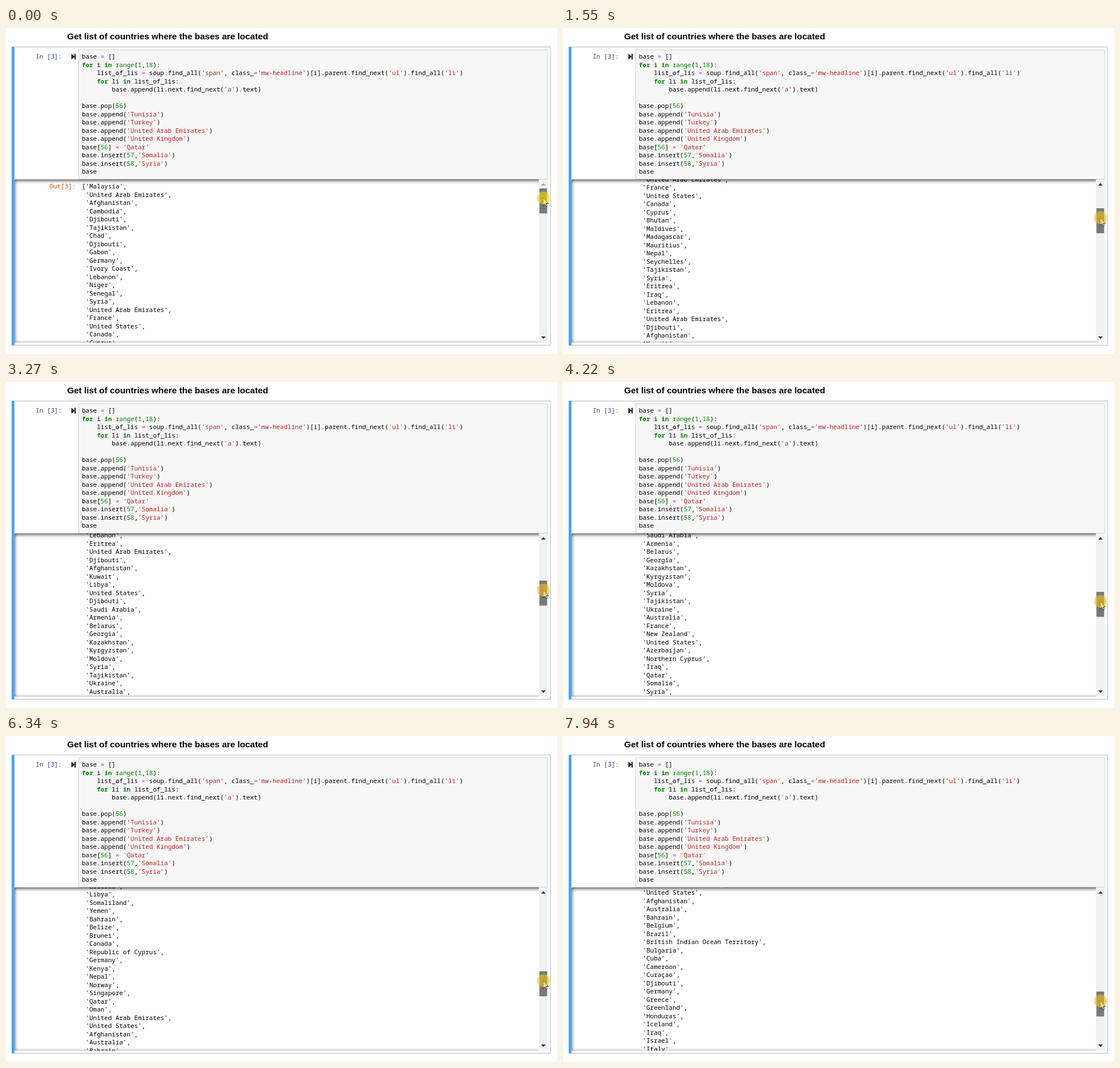
An HTML page that plays this animation: 973x575 px, repeating every 8000 ms.

```html
<!DOCTYPE html>
<html lang="en">
<head>
<meta charset="utf-8">
<title>Notebook output scroll</title>
<style>
  html, body { margin: 0; width: 100%; height: 100%; overflow: hidden; background: #fff; }
  #stage { position: absolute; left: 0; top: 0; width: 973px; height: 575px; overflow: hidden; background: #fff; }
  /* The right edge of the shadow stays hidden behind the scrollbar */
  #shadow {
    position: absolute; left: 15px; top: 267px; width: 942px; height: 288px;
    border-radius: 2px; box-shadow: inset 0 1.7px 6.9px rgba(0, 0, 0, .8);
  }
  svg { position: absolute; left: 0; top: 0; display: block; }
  text { font: 11px "Noto Sans Mono", "DejaVu Sans Mono", monospace; white-space: pre; }
  .title { font: bold 15.43px "Liberation Sans", Arial, sans-serif; }
  .keyword { fill: #008000; font-weight: bold; }
  .builtin { fill: #008000; }
  .number { fill: #008800; }
  .string { fill: #ba2121; }
  .operator { fill: #aa22ff; }
</style>
</head>
<body>
<div id="stage">
  <div id="shadow"></div>
  <svg width="973" height="575" viewBox="0 0 973 575">
    <text class="title" x="108" y="20">Get list of countries where the bases are located</text>

    <rect x="14.5" y="33.5" width="947" height="526" fill="none" stroke="#b8b8b8"/>
    <rect x="10" y="33" width="4.6" height="527" fill="#42a5f5"/>
    <rect x="128.5" y="38.5" width="828" height="228" fill="#f7f7f7" stroke="#cfcfcf"/>
    <text x="52.5" y="54" fill="#303f9f">In [3]:</text>
    <path d="M115.5 45.3V55.7L121 50.8V55.5H123V45.5H121V50.2Z" fill="#1c0d18"/>
    <g id="code"></g>

    <svg x="15" y="267" width="926" height="288" overflow="hidden">
      <g id="output">
        <text x="62" y="16" fill="#d84315">Out[3]:</text>
      </g>
    </svg>

    <rect x="941" y="267" width="16" height="288" fill="#f1f1f1"/>
    <path id="up" d="M945 278L949 273.6L953 278Z"/>
    <path d="M945 544L949 548.4L953 544Z" fill="#40202a"/>
    <g id="drag">
      <rect x="942" y="283" width="13.5" height="44" fill="#787878"/>
      <path d="M948.5 299.5V313.1L951.7 310.2L953.8 314.9L955.8 314L953.8 309.5H957.9Z"
            fill="#fff" stroke="#111" stroke-width=".85"/>
      <circle id="halo" cx="949" cy="299.5" r="11.3" fill-opacity=".62"/>
    </g>
  </svg>
</div>
<script>
const LOOP = 8000;
const LINE = 14.5;
const SCROLL_RATIO = 6.59;
const byId = id => document.getElementById(id);

const code = `base = []
for i in range(1,18):
    list_of_lis = soup.find_all('span', class_='mw-headline')[i].parent.find_next('ul').find_all('li')
    for li in list_of_lis:
        base.append(li.next.find_next('a').text)

base.pop(56)
base.append('Tunisia')
base.append('Turkey')
base.append('United Arab Emirates')
base.append('United Kingdom')
base[56] = 'Qatar'
base.insert(57,'Somalia')
base.insert(58,'Syria')
base`;

const countries = `Malaysia,United Arab Emirates,Afghanistan,Cambodia,Djibouti,Tajikistan,Chad,Djibouti,Gabon,Germany,
Ivory Coast,Lebanon,Niger,Senegal,Syria,United Arab Emirates,France,United States,Canada,Cyprus,
Bhutan,Maldives,Madagascar,Mauritius,Nepal,Seychelles,Tajikistan,Syria,Eritrea,Iraq,
Lebanon,Eritrea,United Arab Emirates,Djibouti,Afghanistan,Kuwait,Libya,United States,Djibouti,Saudi Arabia,
Armenia,Belarus,Georgia,Kazakhstan,Kyrgyzstan,Moldova,Syria,Tajikistan,Ukraine,Australia,
France,New Zealand,United States,Azerbaijan,Northern Cyprus,Iraq,Qatar,Somalia,Syria,Eritrea,
Libya,Somaliland,Yemen,Bahrain,Belize,Brunei,Canada,Republic of Cyprus,Germany,Kenya,
Nepal,Norway,Singapore,Qatar,Oman,United Arab Emirates,United States,Afghanistan,Australia,Bahrain,
Belgium,Brazil,British Indian Ocean Territory,Bulgaria,Cuba,Cameroon,Curaçao,Djibouti,Germany,Greece,
Greenland,Honduras,Iceland,Iraq,Israel,Italy`.split(/,\s*/);

// Drag bursts: first step (ms), last step (ms), step count, scroll offset reached
const bursts = [
  [220, 410, 4, 44], [550, 1290, 13, 186], [1360, 1550, 4, 230], [1620, 2130, 9, 319.6],
  [2200, 2270, 2, 339.5], [2380, 2750, 6, 391.7], [2900, 3660, 13, 504.8], [3710, 4220, 8, 574.5],
  [4270, 4450, 3, 601.2], [4540, 5280, 13, 716.7], [5390, 5460, 2, 734.5], [5520, 6180, 12, 850.6],
  [6270, 6340, 2, 870], [6390, 7070, 11, 977.7], [7130, 7870, 12, 1095.2], [7940, 7940, 1, 1105]
];

function addText(parent, x, y, content) {
  const el = document.createElementNS("http://www.w3.org/2000/svg", "text");
  el.setAttribute("x", x);
  el.setAttribute("y", y);
  el.innerHTML = content;
  parent.appendChild(el);
}

function highlight(line) {
  return line.replace(/('[^']*')|\b(for|in)\b|\b(range)\b|\b(\d+)\b|(=)/g, (token, ...groups) => {
    const kind = ["string", "keyword", "builtin", "number", "operator"][groups.findIndex(Boolean)];
    return `<tspan class="${kind}">${token}</tspan>`;
  });
}

function scrollAt(time) {
  let offset = 0;
  for (const [start, end, steps, target] of bursts) {
    if (time < start) break;
    const gap = (end - start) / Math.max(1, steps - 1);
    const done = time >= end ? steps : Math.floor((time - start) / gap) + 1;
    offset += (target - offset) * done / steps;
  }
  return offset;
}

function render(time) {
  const scroll = scrollAt(time);
  const dragging = scroll > 0;
  byId("output").setAttribute("transform", `translate(0 ${-scroll})`);
  byId("drag").setAttribute("transform", `translate(0 ${scroll / SCROLL_RATIO})`);
  byId("up").setAttribute("fill", dragging ? "#17423c" : "#a3a3a3");
  byId("halo").setAttribute("fill", dragging ? "#efbe1e" : "#f5dc10");
}

code.split("\n").forEach((line, i) => addText(byId("code"), 134, 54 + i * LINE, highlight(line)));
countries.forEach((name, i) =>
  addText(byId("output"), 119, 16 + i * LINE, `${i ? " " : "["}'${name}',`));

const began = performance.now();
function tick() {
  render((performance.now() - began) % LOOP);
  requestAnimationFrame(tick);
}
tick();
</script>
</body>
</html>
```
